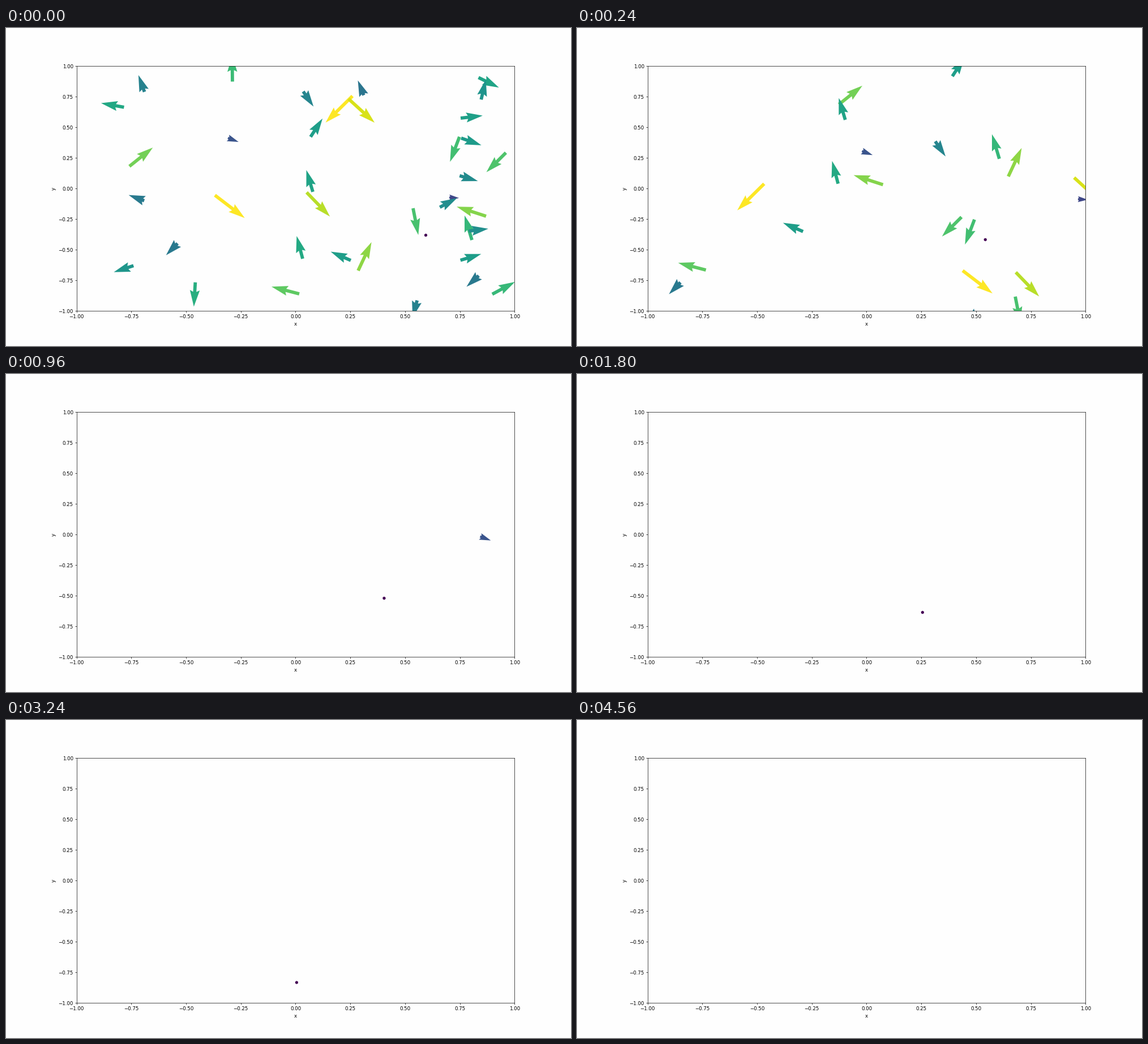
Animation, 998 px wide and 561 px high, one loop 8 s. Source, as a matplotlib script:

```python
import numpy as np
import matplotlib.pyplot as plt
from matplotlib.animation import FuncAnimation

WIDTH, HEIGHT = 998, 561
DPI = WIDTH / 16
INTERVAL, LOOP, STEP = 20, 8000, 60
LAST_STEP = 76
SPEED = 0.00383          # data units per step for one pixel of arrow

CENTER = np.array([WIDTH * 0.5125, HEIGHT * 0.505])
HALF = np.array([WIDTH * 0.775, HEIGHT * 0.77]) / 2
rng = np.random.default_rng(7)

# Arrows that cross the box: tail x, y and arrow dx, dy in pixels (y down).
CROSSING = np.array([
    (392, 194, 18.8, 7), (835, 437, -21.6, 19.5), (218, 244, 41.3, -33),
    (542, 289, -11.5, -38.4), (538, 192, 21.1, -32.3), (525, 112, 18.2, 26.6),
    (823, 374, -13, -43.3), (622, 428, 23.6, -50.2), (612, 120, -47.5, 46.8),
    (605, 125, 46.1, 42), (783, 299, 17.2, 0.9), (524, 407, -10.6, -40),
    (848, 332, -51.9, -16.8), (609, 410, -35.4, -15.4), (883, 220, -34.4, 34.3),
    (801, 192, -16.7, 44.1), (518, 469, -49, -12.7), (303, 380, -20.3, 20.8),
    (369, 295, 52.7, 40.2), (531, 290, 41.2, 42.6), (719, 318, 9.3, 47.1),
])


def to_data(px):
    return (px - CENTER) / HALF * (1, -1)


def leaving(angle, count):
    """Arrows spread along one side, about to fly out through it."""
    out = np.array([np.cos(angle), np.sin(angle)])
    side = np.array([-out[1], out[0]])
    along = 2 * (np.arange(count) + rng.uniform(0.3, 0.7, count)) / count - 1
    length = rng.uniform(28, 50, count)
    heading = angle + rng.uniform(-0.5, 0.5, count)
    inset = length * SPEED * rng.uniform(0.5, 2.8, count)
    tails = np.outer(1 - inset, out) + np.outer(along, side)
    return tails, length[:, None] * np.column_stack([np.cos(heading), np.sin(heading)])


def slow_tail(step):
    """Nearly steady drift with a small push that fades out."""
    push = 1 - np.exp(-step / 8)
    return to_data(np.array([741.5 - 4.03 * step - 10.5 * push,
                             365.5 + 1.77 * step + 2 * push]))


groups = [(to_data(CROSSING[:, :2]), CROSSING[:, 2:] * (1, -1))]
groups += [leaving(quarter * np.pi / 2, count) for quarter, count in enumerate((8, 4, 3, 2))]
tails = np.vstack([g[0] for g in groups])
arrows = np.vstack([g[1] for g in groups])
vel = np.vstack([arrows, (-2.8, -2.1)])


def positions(step):
    return np.vstack([tails + arrows * SPEED * step, slow_tail(step)])


fig = plt.figure(figsize=(WIDTH / DPI, HEIGHT / DPI), dpi=DPI, facecolor="#fefefe")
ax = fig.add_subplot(facecolor="#fefefe")
ax.set(xlim=(-1, 1), ylim=(-1, 1), xlabel="x", ylabel="y",
       xticks=np.linspace(-1, 1, 9), yticks=np.linspace(-1, 1, 9))

quiver = ax.quiver(*positions(0).T, *vel.T, np.hypot(*vel.T), cmap="viridis",
                   scale=2 * HALF[0], width=0.0075)
quiver.set_clim(4, 66)


def update(i):
    quiver.set_offsets(positions(min(i * INTERVAL // STEP, LAST_STEP)))
    return quiver,


anim = FuncAnimation(fig, update, frames=LOOP // INTERVAL, interval=INTERVAL,
                     repeat=True, repeat_delay=0)
plt.show()
```
